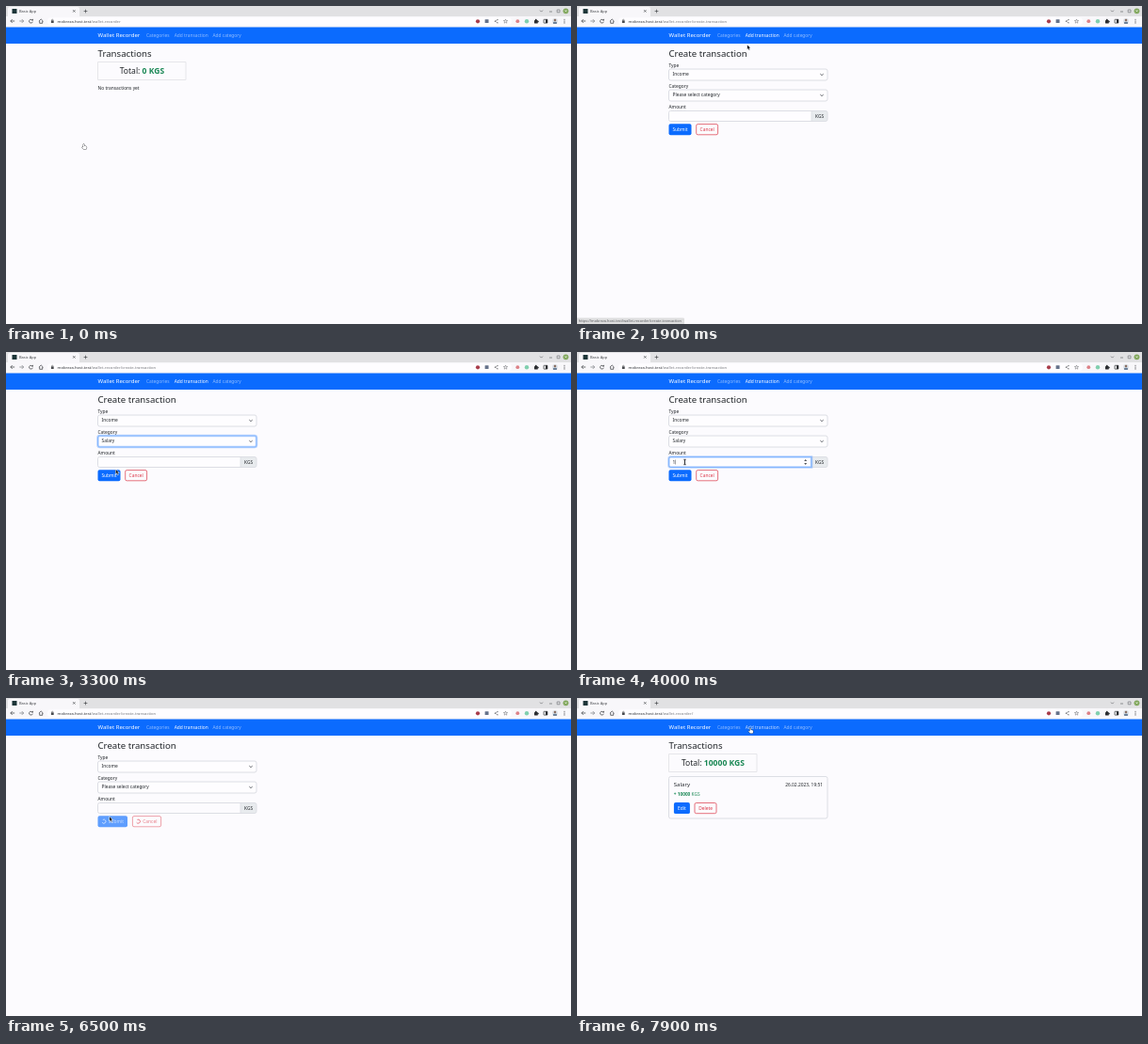
Recreate the animation shown at these times as an HTML page with a canvas. Size 600 px wide and 338 px high, loop 8000 ms.

```html
<!DOCTYPE html>
<html lang="en">
<head>
<meta charset="utf-8">
<title>Wallet Recorder</title>
<style>
  html, body { margin: 0; width: 100%; height: 100%; overflow: hidden; background: #fcfbfe; }
  canvas { display: block; width: 600px; height: 338px; }
</style>
</head>
<body>
<canvas id="stage"></canvas>
<script>
const W = 600, H = 338, LOOP = 8000, STEP = 100;
const canvas = document.getElementById('stage');
const ctx = canvas.getContext('2d');
const dpr = window.devicePixelRatio || 1;
canvas.width = W * dpr;
canvas.height = H * dpr;

const INK = '#212529', BLUE = '#0b6bfe', BLUE_DARK = '#0b5ed7', RED = '#dc3545';
const GREEN = '#198754', BORDER = '#dcdee4', PAGE = '#fcfbfe', ICON = '#4a4c50';
const BODY = 4.85;
const HOST = 'mobreza.host.test', PATH = '/wallet-recorder', CREATE = '/create-transaction';

// Moments at which the screen changes
const AT = {
  status: 1000, create: 1500, leaveNav: 2000, open: 2300, pick: 2900,
  focus: 3700, blur: 6100, loading: 6200, list: 6800
};
const TYPED = [[4000, '1'], [4200, '10'], [4300, '100'], [4400, '1000'], [4600, '10000']];

// Pointer: time, x, y
const TRACK = [
  [0, 82.5, 146.8], [1000, 186.5, 35.2], [1800, 186.5, 35.2],
  [2300, 132, 95], [2500, 120, 108.5], [3000, 120, 108.5],
  [3400, 116, 128], [3700, 114.5, 117], [5200, 114.5, 117],
  [5600, 110, 126.2], [7300, 110, 126.2], [7900, 184, 32]
];

const ease = u => u * u * (3 - 2 * u);

function pointer(t) {
  let i = TRACK.length - 1;
  while (i > 0 && TRACK[i][0] > t) i--;
  const a = TRACK[i], b = TRACK[i + 1] || a;
  const u = b === a ? 0 : ease((t - a[0]) / (b[0] - a[0]));
  return { x: a[1] + (b[1] - a[1]) * u, y: a[2] + (b[2] - a[2]) * u };
}

const inside = (p, x, y, w, h) => p.x >= x && p.x <= x + w && p.y >= y && p.y <= y + h;

function fill(x, y, w, h, color, r = 0) {
  ctx.fillStyle = color;
  ctx.beginPath();
  ctx.roundRect(x, y, w, h, r);
  ctx.fill();
}

function frame(x, y, w, h, color, r = 0, line = 1) {
  ctx.strokeStyle = color;
  ctx.lineWidth = line;
  ctx.beginPath();
  ctx.roundRect(x, y, w, h, r);
  ctx.stroke();
}

function disc(x, y, r, color) {
  ctx.fillStyle = color;
  ctx.beginPath();
  ctx.arc(x, y, r, 0, 7);
  ctx.fill();
}

function line(points, color = ICON, width = 0.8) {
  ctx.strokeStyle = color;
  ctx.lineWidth = width;
  ctx.beginPath();
  points.forEach(([x, y]) => ctx.lineTo(x, y));
  ctx.stroke();
}

function shape(points, color) {
  ctx.fillStyle = color;
  ctx.beginPath();
  points.forEach(([x, y]) => ctx.lineTo(x, y));
  ctx.closePath();
  ctx.fill();
}

// Text is set large and scaled down, so that tiny glyphs keep exact spacing.
// y is the middle of the capitals; returns the width.
function text(str, x, y, size = BODY, color = INK, weight = 400, align = 'left') {
  const k = 10;
  ctx.save();
  ctx.translate(x, y + size * 0.36);
  ctx.scale(1 / k, 1 / k);
  ctx.font = `${weight} ${size * k}px "Noto Sans", "Open Sans", sans-serif`;
  ctx.fillStyle = color;
  ctx.textAlign = align;
  ctx.fillText(str, 0, 0);
  const w = ctx.measureText(str).width / k;
  ctx.restore();
  return w;
}

function tabStrip() {
  fill(0, 0, W, 11, '#e1e1e3');
  fill(2, 1, 76, 11, '#f8f7fa', [2, 2, 0, 0]);
  fill(6.5, 3, 5, 5, '#1d3538');
  text('Basic App', 14, 5.5, 4, '#45474b');
  line([[71.2, 4.3], [73.4, 6.5]]);
  line([[73.4, 4.3], [71.2, 6.5]]);
  line([[82.6, 5.5], [86.4, 5.5]], ICON, 0.7);
  line([[84.5, 3.6], [84.5, 7.4]], ICON, 0.7);
  line([[567, 4.6], [568.5, 6.1], [570, 4.6]], '#66686c', 0.7);
  line([[577, 6], [580, 6]], '#66686c', 0.7);
  frame(585.2, 4, 2.8, 2.8, '#66686c', 0, 0.6);
  disc(594.5, 5.3, 2.9, '#7fa65a');
  line([[593.5, 4.3], [595.5, 6.3]], '#fff', 0.6);
  line([[595.5, 4.3], [593.5, 6.3]], '#fff', 0.6);
}

function arrowIcon(x, dir, color) {
  line([[x - 2.2, 16], [x + 2.2, 16]], color);
  line([[x + dir * 0.3, 14.1], [x + dir * 2.2, 16], [x + dir * 0.3, 17.9]], color);
}

function toolbar(path) {
  fill(0, 11, W, 12, '#f8f7fa');
  fill(44, 12.3, 493, 8, '#fefdff', 4);
  arrowIcon(7, -1, ICON);
  arrowIcon(16.5, 1, '#85878b');

  ctx.strokeStyle = ICON;
  ctx.lineWidth = 0.8;
  ctx.beginPath();
  ctx.arc(26.5, 16.2, 1.9, 0.3, 5.6);
  ctx.stroke();
  shape([[26.9, 15.6], [28.9, 13.6], [28.9, 15.6]], ICON);

  line([[34.9, 16.2], [37.2, 14], [39.5, 16.2]], ICON, 0.8);
  line([[35.7, 16], [35.7, 18.3], [38.7, 18.3], [38.7, 16]], ICON, 0.8);

  fill(47.9, 15.6, 2.8, 2.5, ICON, 0.3);
  frame(48.5, 14.2, 1.6, 2, ICON, 0.8, 0.5);
  const w = text(HOST, 54.5, 16, 4.2, '#303236');
  text(path, 54.5 + w, 16, 4.2, '#77797e');

  disc(501, 16.3, 2.1, '#a83c4a');
  fill(508.6, 14.2, 3.9, 3.9, '#65728a', 0.4);
  line([[522, 14.6], [519.4, 16.2], [522, 17.8]], '#66686c', 0.5);
  [[522, 14.6], [519.4, 16.2], [522, 17.8]].forEach(([x, y]) => disc(x, y, 0.65, '#66686c'));

  ctx.beginPath();
  for (let i = 0; i < 10; i++) {
    const a = i * Math.PI / 5 - Math.PI / 2, r = i % 2 ? 1 : 2.3;
    ctx.lineTo(530.5 + r * Math.cos(a), 16.3 + r * Math.sin(a));
  }
  ctx.closePath();
  ctx.strokeStyle = '#66686c';
  ctx.lineWidth = 0.5;
  ctx.stroke();

  disc(543.3, 16.2, 1.9, '#dd8187');
  disc(553, 16.2, 2.2, '#80cfae');
  fill(561, 15, 3.8, 3.4, '#2c2e32', 0.4);
  disc(562.8, 14.7, 0.9, '#2c2e32');
  disc(565, 16.6, 0.8, '#2c2e32');
  frame(571.1, 14.3, 3.8, 3.8, '#2c2e32', 0.2, 0.7);
  fill(573, 14.3, 2, 3.8, '#2c2e32');
  disc(583, 16.1, 3, '#dfe4ea');
  disc(583, 15, 1.3, '#8b7064');
  fill(580.9, 16.7, 4.2, 2.3, '#6d8199', [1.4, 1.4, 0.8, 0.8]);
  [14.3, 16.1, 17.9].forEach(y => disc(593, y, 0.55, ICON));
}

function navbar(active, hovered) {
  fill(0, 22.5, W, 17.5, BLUE);
  text('Wallet Recorder', 97.5, 31.2, 6.03, '#fff');
  const link = alpha => `rgba(255,255,255,${alpha})`;
  text('Categories', 149, 31.2, BODY, link(0.55));
  text('Add transaction', 178.7, 31.2, BODY, link(active ? 1 : hovered ? 0.78 : 0.55));
  text('Add category', 219.5, 31.2, BODY, link(0.55));
}

function button(label, x, y, w, color, solid, back = color) {
  if (solid) fill(x, y, w, 12, back, 1.9);
  else frame(x + 0.4, y + 0.4, w - 0.8, 11.2, color, 1.6, 0.7);
  text(label, x + w / 2, y + 6, BODY, solid ? '#fff' : color, 400, 'center');
}

function spinner(x, y, color, t) {
  const a = t / 750 * 2 * Math.PI;
  ctx.strokeStyle = color;
  ctx.lineWidth = 0.95;
  ctx.beginPath();
  ctx.arc(x, y, 2.05, a, a + Math.PI * 1.5);
  ctx.stroke();
}

function busyButton(label, x, w, color, solid, t) {
  const front = solid ? '#fff' : color;
  ctx.globalAlpha = 0.65;
  if (solid) fill(x, 125.2, w, 12, color, 1.9);
  else frame(x + 0.4, 125.6, w - 0.8, 11.2, color, 1.6, 0.7);
  spinner(x + 6.4, 131.2, front, t);
  text(label, x + 11.3, 131.2, BODY, front);
  ctx.globalAlpha = 1;
}

function ring(x, y, w, h, r = 2) {
  frame(x, y, w, h, 'rgba(13,110,253,.27)', r, 2.5);
  frame(x, y, w, h, '#86b7fe', r);
}

function select(value, y, focused) {
  fill(97.5, y, 168.5, 12, '#fefdff', 2);
  if (focused) ring(97.5, y, 168.5, 12);
  else frame(97.5, y, 168.5, 12, BORDER, 2);
  text(value, 101.5, y + 5.7);
  line([[258.3, y + 5.1], [260, y + 6.7], [261.7, y + 5.1]], '#343a40', 0.75);
}

function amountField(t, focused) {
  fill(249, 111.5, 17, 11, '#e8ebee', [0, 2, 2, 0]);
  frame(97.5, 111.5, 168.5, 11, BORDER, 2);
  text('KGS', 257.6, 117, BODY, INK, 400, 'center');
  if (t < AT.loading) fill(98, 112, 151, 10, '#fefdff', [2, 0, 0, 2]);
  line([[249, 111.5], [249, 122.5]], BORDER, 0.8);
  if (focused) {
    ring(97.5, 111.5, 151.5, 11, [2, 0, 0, 2]);
    shape([[241.2, 116], [244.2, 116], [242.7, 114]], '#505357');
    shape([[241.2, 118], [244.2, 118], [242.7, 120]], '#505357');
  }
  if (t >= AT.loading) return;
  const value = TYPED.reduce((v, [at, s]) => t >= at ? s : v, '');
  const w = text(value, 101.5, 117);
  if (focused) fill(101.7 + w, 114.4, 0.4, 5.2, INK);
}

function menu() {
  ctx.save();
  ctx.shadowColor = 'rgba(0,0,0,.3)';
  ctx.shadowBlur = 2 * dpr;
  fill(97.5, 100.8, 168.5, 13, '#f5f4f6');
  ctx.restore();
  text('Please select category', 101.5, 104.1, BODY, '#929397');
  fill(97.5, 107.5, 168.5, 6.3, '#8da866');
  text('Salary', 101.5, 110.6, BODY, '#fff');
}

function createPage(t, p) {
  const busy = t >= AT.loading;
  const isOpen = t >= AT.open && t < AT.pick;
  text('Create transaction', 97.5, 51, 9.65, INK, 500);
  text('Type', 97.5, 63.2);
  select('Income', 67, false);
  text('Category', 97.5, 85.2);
  select(t >= AT.pick && !busy ? 'Salary' : 'Please select category', 89, t >= AT.open && t < AT.focus);
  text('Amount', 97.5, 107.1);
  amountField(t, t >= AT.focus && t < AT.blur);
  if (busy) {
    busyButton('Submit', 97.5, 31.5, BLUE, true, t);
    busyButton('Cancel', 134, 31, RED, false, t);
  } else {
    const hover = inside(p, 97.5, 125.2, 24, 12);
    button('Submit', 97.5, 125.2, 24, BLUE, true, hover ? BLUE_DARK : BLUE);
    button('Cancel', 126.3, 125.2, 23.7, RED, false);
  }
  if (isOpen) menu();
}

function listPage(sum, p) {
  text('Transactions', 97.5, 51, 9.65, INK, 500);
  frame(97.5, 59.5, 93.5, 19, '#e6e6ea');
  const size = 8.55, label = 'Total: ', total = sum + ' KGS';
  ctx.font = `400 ${size * 10}px "Noto Sans", "Open Sans", sans-serif`;
  const w1 = ctx.measureText(label).width / 10;
  ctx.font = `700 ${size * 10}px "Noto Sans", "Open Sans", sans-serif`;
  const x = 144.4 - (w1 + ctx.measureText(total).width / 10) / 2;
  text(label, x, 69, size);
  text(total, x + w1, 69, size, GREEN, 700);
  if (!sum) {
    text('No transactions yet', 97.5, 87);
    return;
  }
  frame(97.5, 83.5, 168.5, 44.5, BORDER, 2);
  text('Salary', 102.8, 92.3, 6.03, INK, 500);
  text('26.02.2023, 19:51', 261, 92.3, BODY, INK, 400, 'right');
  const w = text('+ ' + sum, 102.8, 102.2, 4.75, GREEN, 700);
  text(' KGS', 102.8 + w, 102.2, 4.75, GREEN);
  button('Edit', 102.9, 111.1, 17, BLUE, true, inside(p, 103, 111, 17, 12) ? BLUE_DARK : BLUE);
  button('Delete', 124.6, 111.1, 23.8, RED, false);
}

function statusBar() {
  fill(0, 331.5, 114, 6.5, '#dededf', [0, 1.2, 0, 0]);
  text('https://' + HOST + PATH + CREATE, 1.8, 334.8, 3.85, '#5b5d61');
}

function outlined(points) {
  ctx.lineJoin = 'round';
  ctx.beginPath();
  points.forEach(([x, y]) => ctx.lineTo(x, y));
  ctx.closePath();
  ctx.fillStyle = '#fff';
  ctx.strokeStyle = '#16181c';
  ctx.lineWidth = 0.7;
  ctx.stroke();
  ctx.fill();
}

const CURSORS = {
  arrow() {
    shape([[-0.4, -0.7], [-0.4, 5.4], [1, 4.2], [1.9, 6.2], [3, 5.7], [2.1, 3.8], [4.1, 3.7]], '#fff');
    shape([[0, 0], [0, 4.5], [1.1, 3.5], [2, 5.5], [2.6, 5.2], [1.7, 3.3], [3.2, 3.2]], '#16181c');
  },
  hand() {
    outlined([[-0.4, 0], [0.5, 0], [0.6, 2], [2.9, 2.5], [3.2, 3.3], [2.7, 5.4],
      [0, 5.4], [-1.9, 3.5], [-1.4, 3], [-0.4, 3.6]]);
  },
  beam() {
    line([[0, -2.6], [0, 2.6]], '#16181c', 0.9);
    line([[-1.3, -2.7], [1.3, -2.7]], '#16181c', 0.7);
    line([[-1.3, 2.7], [1.3, 2.7]], '#16181c', 0.7);
  }
};

function cursorKind(t, p) {
  if (t < 100) return 'hand';
  if (inside(p, 176, 24, 41, 15)) return 'hand';
  if (t >= AT.create && t < AT.loading) {
    if (inside(p, 97.5, 125.2, 24, 12)) return 'hand';
    if (t > AT.pick + 200 && inside(p, 97.5, 111.5, 151, 11)) return 'beam';
  }
  if (t >= AT.list && inside(p, 103, 111, 17, 12)) return 'hand';
  return 'arrow';
}

function draw(t) {
  const p = pointer(t);
  const creating = t >= AT.create && t < AT.list;
  ctx.setTransform(dpr, 0, 0, dpr, 0, 0);
  fill(0, 0, W, H, PAGE);
  tabStrip();
  toolbar(creating ? PATH + CREATE : t >= AT.list ? PATH + '/' : PATH);
  navbar(creating, inside(p, 176, 24, 41, 15));
  if (creating) createPage(t, p);
  else listPage(t >= AT.list ? 10000 : 0, p);
  if (t >= AT.status && t < AT.leaveNav) statusBar();
  ctx.save();
  ctx.translate(p.x, p.y);
  CURSORS[cursorKind(t, p)]();
  ctx.restore();
}

const start = performance.now();
function tick() {
  const t = (performance.now() - start) % LOOP;
  draw(Math.floor(t / STEP) * STEP);
  requestAnimationFrame(tick);
}
tick();
</script>
</body>
</html>
```
